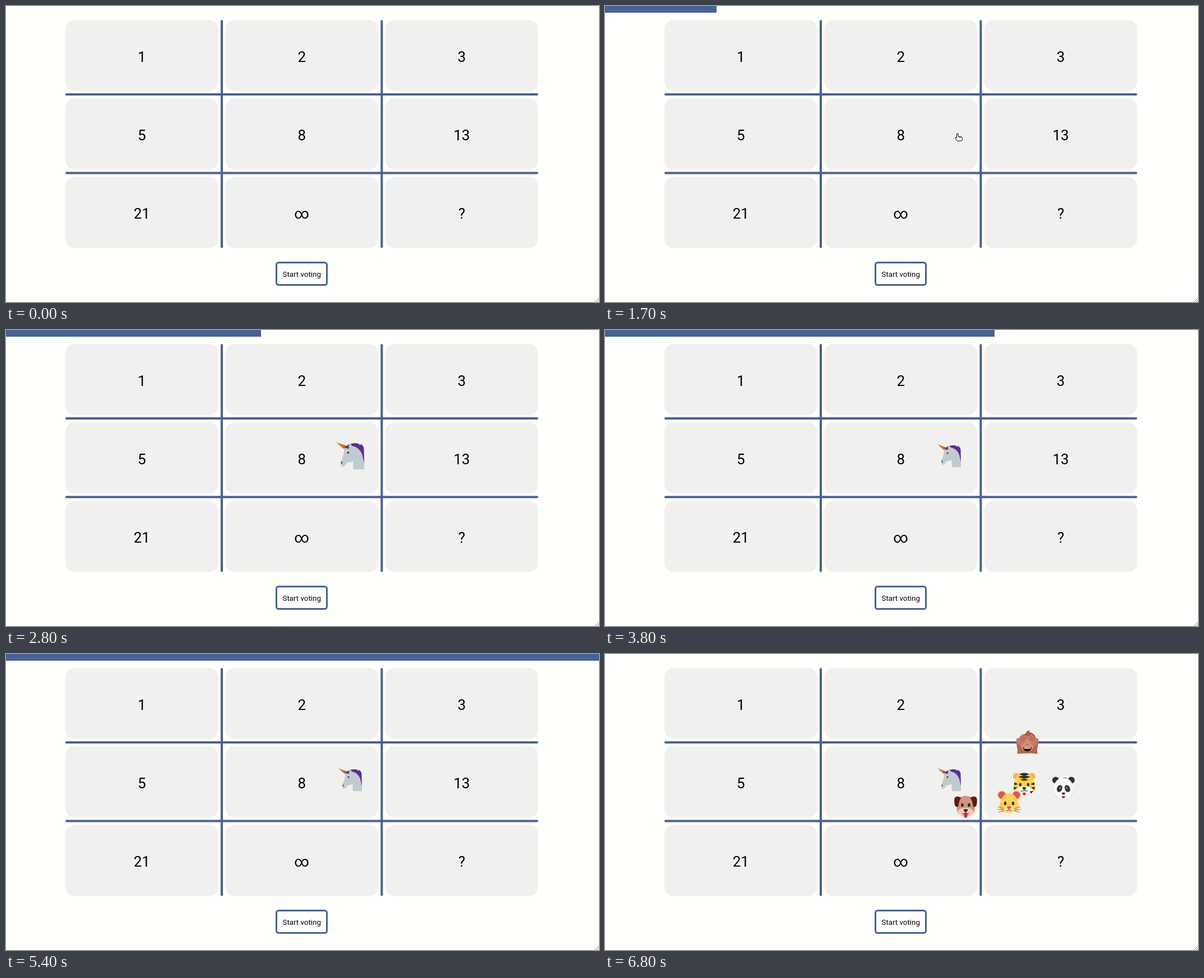
Write an HTML page that moves like this. It is 1058x529 px and loops after 8.3 s.

```html
<!DOCTYPE html>
<html lang="en">
<head>
<meta charset="utf-8">
<title>Voting board</title>
<style>
  html, body { margin: 0; width: 100%; height: 100%; overflow: hidden; background: #fffffc; }
  svg { display: block; width: 1058px; height: 529px; }
  text { font-family: Roboto, Arial, sans-serif; text-anchor: middle; fill: #000; }
  .value { font-size: 26px; }
  .label { font-size: 13.333px; }
  .accent { fill: #466197; }
</style>
</head>
<body>
<svg viewBox="0 0 1058 529">
  <g id="board"></g>
  <rect id="button" x="482.5" y="458.5" width="90" height="40" rx="4" stroke="#466197" stroke-width="3"/>
  <text class="label" x="527.7" y="484">Start voting</text>
  <path d="M1051 529l7-7M1055 529l3-3" stroke="#777" stroke-width="1"/>
  <rect id="bar" class="accent" height="12"/>

  <g id="unicorn">
    <path d="M-4-15Q5-20 13-17L15-15 16-17Q20-14 20.500-10L21 12 15 4Z" fill="#5c2e91"/>
    <path d="M-21-20-5-14-9-9Z" fill="#f28a1e"/>
    <path d="M-15-17-16-15M-11-16-13-13M-8-15-11-11" stroke="#b5451c" stroke-width="1.300"/>
    <path d="M-9-10Q-5-14-2-14L0-18 3-14Q14-12 18-1L21 12V21H5Q4 13 5 8Q0 11-5 11Q-8 17-12 17Q-15 15-14 9Q-9 1-9-10Z" fill="#c0cbd0"/>
    <path d="M-9-11Q-5-16 0-15L-2-10Z" fill="#5c2e91"/>
    <path d="M-3-12 0-18 2-13Z" fill="#c0cbd0"/>
    <circle cx="-3" cy="-4" r="1.500" fill="#2f2f2f"/>
    <ellipse cx="-12.500" cy="11" rx="1.100" ry="1.500" fill="#454b50"/>
  </g>

  <g id="dog">
    <path d="M-12-16Q0-23 12-16Q16-6 16 5Q15 16 0 17Q-15 16-16 5Q-16-6-12-16Z" fill="#d0957c"/>
    <path d="M-10-17Q-17-21-20-15Q-21-7-19-2Q-16 2-13-1Q-12-11-8-16ZM10-17Q17-21 20-15Q21-7 19-2Q16 2 13-1Q12-11 8-16Z" fill="#5d1d12"/>
    <path d="M0 2Q9 1 14 8Q13 16 0 16Q-13 16-14 8Q-9 1 0 2Z" fill="#f5cbbb"/>
    <path d="M-3 12H3V17Q2 20 0 20Q-2 20-3 17Z" fill="#d21f3f"/>
    <path d="M-6 12Q-2 14 0 10Q2 14 6 12" fill="none" stroke="#4a342e" stroke-width="1.200"/>
    <path d="M-4 5Q0 3 4 5Q3 9 0 10Q-3 9-4 5Z" fill="#302c2c"/>
    <ellipse cx="-6" cy="-3" rx="2.300" ry="3.200" fill="#302c2c"/>
    <ellipse cx="6" cy="-3" rx="2.300" ry="3.200" fill="#302c2c"/>
    <path d="M-9 9h1M-7 12h1M8 9h1M6 12h1" stroke="#cc7965" stroke-width="1.200"/>
  </g>

  <g id="panda">
    <circle cx="-14" cy="-14" r="6" fill="#333"/>
    <circle cx="14" cy="-14" r="6" fill="#333"/>
    <path d="M0-18Q14-18 17-3Q20 8 12 15Q7 20 0 20Q-7 20-12 15Q-20 8-17-3Q-14-18 0-18Z" fill="#fafafa"/>
    <path d="M-17 3Q-18 14-8 18M17 3Q18 14 8 18" fill="none" stroke="#dedede" stroke-width="1.200"/>
    <ellipse cx="-7" cy="1" rx="4.600" ry="6.500" transform="rotate(22 -7 1)" fill="#333"/>
    <ellipse cx="7" cy="1" rx="4.600" ry="6.500" transform="rotate(-22 7 1)" fill="#333"/>
    <circle cx="-6" cy="0" r="1.700" fill="#888"/>
    <circle cx="6" cy="0" r="1.700" fill="#888"/>
    <path d="M-3.500 9Q0 7 3.500 9Q2 12 0 12Q-2 12-3.500 9Z" fill="#302c2c"/>
    <path d="M-3 15Q0 13 3 15Q2 18.500 0 18.500Q-2 18.500-3 15Z" fill="#d32045"/>
  </g>

  <g id="monkey">
    <path d="M-3-15Q-2-21 5-21L3-18Q16-16 16-1L18 21Q10 19 0 20Q-10 20-18 21L-16-1Q-15-14-3-15Z" fill="#ad5c49"/>
    <path d="M0-10Q9-11 11-4Q14 17 0 18Q-14 17-11-4Q-9-11 0-10Z" fill="#d98f79"/>
    <path d="M-8 9Q0 11 8 9Q7 17 0 17Q-7 17-8 9Z" fill="#4a1714"/>
    <path d="M-6 10H6V11.500H-6Z" fill="#fff"/>
    <path d="M-20-2Q-19-9-15-7L-8-14Q-5-15-5-12L-2-11Q1-8-1-4L-8 5Q-13 10-18 6ZM20-2Q19-9 15-7L8-14Q5-15 5-12L2-11Q-1-8 1-4L8 5Q13 10 18 6Z" fill="#c97b66"/>
    <path d="M-13-4-6-11M-10-1-3-9M13-4 6-11M10-1 3-9" stroke="#964836" stroke-width="1"/>
    <path d="M-20-1Q-18 12-16 20L-9 20Q-12 13-12 8ZM20-1Q18 12 16 20L9 20Q12 13 12 8Z" fill="#b8664f"/>
    <path d="M-2 4h1M1 4h1" stroke="#5b2a20" stroke-width="1.500"/>
  </g>

  <g id="tiger">
    <circle cx="-14" cy="-14" r="6" fill="#f6bd35"/>
    <circle cx="14" cy="-14" r="6" fill="#f6bd35"/>
    <circle cx="-14" cy="-14" r="3.200" fill="#f5a3a0"/>
    <circle cx="14" cy="-14" r="3.200" fill="#f5a3a0"/>
    <path d="M0-20Q14-20 17-5L20 9Q15 18 0 20Q-15 18-20 9L-17-5Q-14-20 0-20Z" fill="#fcd147"/>
    <path d="M-9-18Q0-22 9-18Q4-15 0-15Q-4-15-9-18ZM-11-13Q0-17 11-13Q4-10 0-10Q-4-10-11-13ZM-7-8Q0-11 7-8Q3-6 0-6Q-3-6-7-8Z" fill="#2d2d2d"/>
    <path d="M-18-3-11 0-18 2ZM-19 5-12 6-18 10ZM18-3 11 0 18 2ZM19 5 12 6 18 10Z" fill="#2d2d2d"/>
    <path d="M0 5Q7 3 13 8L17 13Q9 19 0 18Q-9 19-17 13L-13 8Q-7 3 0 5Z" fill="#fff"/>
    <path d="M-17 12-10 13-12 17ZM17 12 10 13 12 17Z" fill="#2d2d2d"/>
    <ellipse cx="-7" cy="1" rx="2.200" ry="3" fill="#302c2c"/>
    <ellipse cx="7" cy="1" rx="2.200" ry="3" fill="#302c2c"/>
    <path d="M-4 6Q0 5 4 6Q2 10 0 10Q-2 10-4 6Z" fill="#302c2c"/>
    <path d="M-6 12Q-2 14 0 10Q2 14 6 12" fill="none" stroke="#302c2c" stroke-width="1.300"/>
    <path d="M-3 16Q0 14 3 16Q2 20 0 20Q-2 20-3 16Z" fill="#d32045"/>
  </g>

  <g id="mouse">
    <circle cx="-13" cy="-12" r="7.800" fill="#fbc638"/>
    <circle cx="13" cy="-12" r="7.800" fill="#fbc638"/>
    <circle cx="-13" cy="-12" r="6.300" fill="#e8496a"/>
    <circle cx="13" cy="-12" r="6.300" fill="#e8496a"/>
    <path d="M0-15Q13-14 16 2Q19 11 14 16Q9 20 0 20Q-9 20-14 16Q-19 11-16 2Q-13-14 0-15Z" fill="#fcd34b"/>
    <ellipse cx="0" cy="13" rx="11" ry="6.500" fill="#fbe08a"/>
    <ellipse cx="-7" cy="3" rx="2.300" ry="3.200" fill="#302c2c"/>
    <ellipse cx="7" cy="3" rx="2.300" ry="3.200" fill="#302c2c"/>
    <path d="M-9 12-20 9M-9 14-21 14M-9 16-19 19M9 12 20 9M9 14 21 14M9 16 19 19" stroke="#a4613f" stroke-width="1"/>
    <path d="M-4 9Q0 7 4 9Q3 13 0 13Q-3 13-4 9Z" fill="#e8496a"/>
    <path d="M-5 16Q-1 17 0 13Q1 17 5 16" fill="none" stroke="#a4613f" stroke-width="1.200"/>
  </g>

  <path id="arrow" d="M.5.5V13L3.500 10.300 5.500 15 7.500 14.200 5.500 9.700H9.500Z" fill="#fff" stroke="#000"/>
  <g id="hand" fill="#fff" stroke="#000" stroke-linejoin="round">
    <path d="M3.500 8.500V2Q3.500.6 4.800.6Q6 .6 6 2V6L11.800 7Q13.500 7.400 13.500 9V11L12.500 14H4.500L1 9.800Q.3 8 2 7.800Z"/>
    <path d="M8.300 6.700V8.500M10.800 7V8.800" fill="none"/>
  </g>
</svg>
<script>
const LOOP = 8300, STEP = 100;
const $ = id => document.getElementById(id);

function draw(tag, attrs, text = '') {
  const el = document.createElementNS('http://www.w3.org/2000/svg', tag);
  for (const k in attrs) el.setAttribute(k, attrs[k]);
  el.textContent = text;
  $('board').append(el);
}

['1', '2', '3', '5', '8', '13', '21', '∞', '?'].forEach((value, i) => {
  const x = 106 + 285.4 * (i % 3), y = 25 + 140.2 * Math.floor(i / 3);
  draw('rect', { x, y, width: 272.6, height: 127, rx: 16, fill: '#f0f0ee' });
  draw('text', { class: 'value', x: x + 136.3, y: Math.round(y + 75) }, value);
});
for (const x of [383, 668.4]) draw('rect', { class: 'accent', x, y: 25, width: 4, height: 407.5, rx: 2 });
for (const y of [156, 296.5]) draw('rect', { class: 'accent', x: 106, y, width: 843.5, height: 4, rx: 2 });

// rows: time, then values
const barKeys = [[800, 0], [900, 8], [1700, 199], [2600, 415], [2800, 455], [3500, 616],
  [3800, 695], [4400, 834], [5300, 1054], [5400, 1058]];
const handKeys = [[500, 547, 499], [600, 547, 499], [700, 549, 485], [800, 549, 485],
  [900, 585, 445], [1100, 675, 335], [1300, 707, 270], [1500, 675, 238],
  [1700, 624, 227], [1900, 609, 218], [2600, 609, 218]];

const POP = [0.93, 1.2, 1.08, 1];
const animals = [
  ['unicorn', 614, 224, 2700, POP],
  ['dog', 643.5, 273, 6100, POP],
  ['panda', 818, 239.5, 6200, POP],
  ['monkey', 753.5, 157.5, 6400, POP],
  ['tiger', 748, 232.5, 6500, POP],
  ['mouse', 721, 264, 6700, [0.93, 1]]
];

function sample(keys, t) {
  if (t <= keys[0][0]) return keys[0].slice(1);
  const i = keys.findIndex(k => k[0] >= t);
  if (i < 0) return keys[keys.length - 1].slice(1);
  const [a, b] = [keys[i - 1], keys[i]];
  const p = (t - a[0]) / (b[0] - a[0]);
  return a.slice(1).map((v, j) => v + (b[j + 1] - v) * p);
}

const show = (id, on) => $(id).setAttribute('visibility', on ? 'visible' : 'hidden');
const move = (id, x, y, s = 1) => $(id).setAttribute('transform', `translate(${x} ${y}) scale(${s})`);

function render(ms) {
  const t = Math.floor((ms % LOOP) / STEP) * STEP;

  $('bar').setAttribute('width', t < 5700 ? Math.round(sample(barKeys, t)[0]) : 0);
  $('button').setAttribute('fill', t >= 500 && t < 900 ? '#f0f0ee' : '#fff');

  show('arrow', t === 400);
  move('arrow', 551, 500);
  show('hand', t >= 500 && t < 2700);
  move('hand', ...sample(handKeys, t).map(Math.round));

  for (const [id, x, y, start, pop] of animals) {
    const i = Math.min((t - start) / STEP, pop.length - 1);
    show(id, i >= 0);
    if (i < 0) continue;
    move(id, x, y, pop[i]);
    $(id).setAttribute('opacity', i === 0 ? 0.88 : 1);
  }
}

const begin = performance.now();
function tick() {
  render(performance.now() - begin);
  requestAnimationFrame(tick);
}
tick();
</script>
</body>
</html>
```
